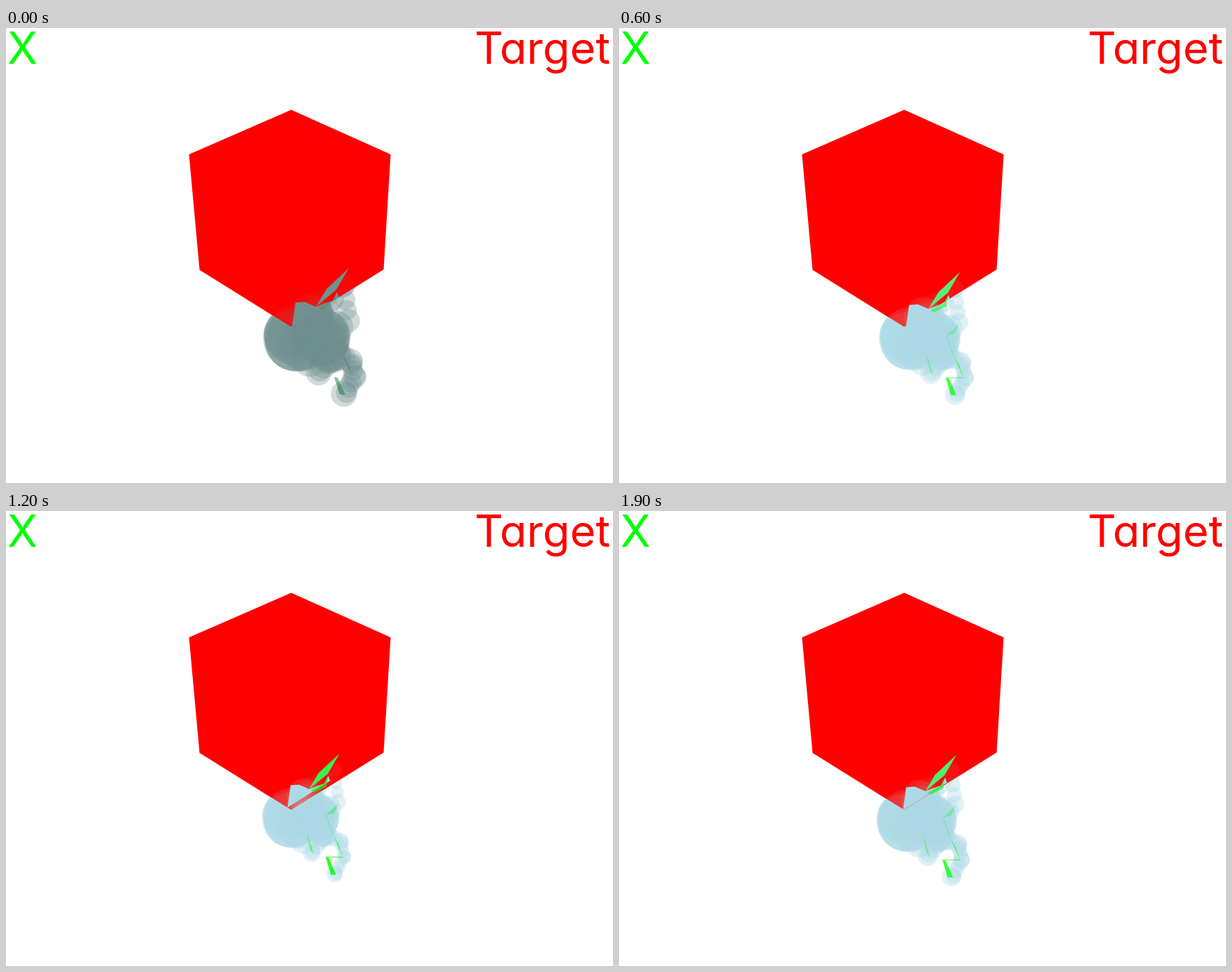
Recreate the animation shown at these times as an HTML page with a canvas. Size 864 by 648 pixels, loop 2000 ms.

```html
<!DOCTYPE html>
<html lang="en">
<head>
<meta charset="utf-8">
<title>Deforming mesh</title>
<style>
  html, body { margin: 0; width: 100%; height: 100%; overflow: hidden; background: #fff; }
  canvas, svg { position: absolute; left: 0; top: 0; width: 864px; height: 648px; }
  text {
    font: 400 63px Inter, sans-serif;
    font-feature-settings: "cv11";
    font-optical-sizing: none;
  }
</style>
</head>
<body>
<canvas id="stage" width="864" height="648"></canvas>
<svg viewBox="0 0 864 648">
  <text x="2" y="51" fill="#0f0">X</text>
  <text x="860" y="51" fill="#f00" text-anchor="end">Target</text>
</svg>
<script>
const ctx = document.getElementById('stage').getContext('2d');
const STEP = 100, FRAMES = 20;

const CUBE = [[406, 116.5], [547.5, 180], [537.5, 344], [406, 426], [275.5, 344.5], [260.5, 180]];

// Resting mesh: silhouette in front of the cube, blade, and bare facets
const SKIN = [[407, 426], [412, 391], [425, 390], [441, 397], [465, 388], [471, 376], [474, 384]];
const BLADE = [[441, 397], [456, 372], [488, 342], [470, 373]];
const STRIP = [[444, 399], [465, 388], [471, 376], [468, 393], [450, 402]];
const SPIKE = [[478, 464], [487, 479], [494, 497]];
const FOOT = [[467, 497], [472, 498], [483, 522], [475, 522]];

// Balls: position, smallest radius, growth with swell
const BALLS = {
  crown: { x: 434, y: 410, core: 20, grow: 15, discs: 8 },
  left:  { x: 414, y: 441, core: 36, grow: 14, discs: 9 },
  right: { x: 449, y: 440, core: 29, grow: 14, discs: 9 },
  belly: { x: 463, y: 464, core: 7, grow: 24, discs: 4 },
  bump:  { x: 445, y: 491, core: 6, grow: 14, discs: 2 },
  side:  { x: 487, y: 417, core: 3, grow: 16, discs: 1 },
  hip:   { x: 491, y: 474, core: 4, grow: 15, discs: 2 },
  knee:  { x: 496, y: 497, core: 2, grow: 17, discs: 2 },
  foot:  { x: 481, y: 521, core: 3, grow: 18, discs: 2 },
  tip:   { x: 480, y: 367, core: 4, grow: 15, discs: 2 }
};
const LINKS = ['left bump', 'right belly', 'belly bump', 'right side', 'belly hip',
  'hip knee', 'knee foot', 'crown tip', 'side tip'].map(s => s.split(' '));

// Breathing of the mesh: frame, swell, drift
const BEATS = [
  { at: 0, swell: .85, dx: 0, dy: 0 },
  { at: 3, swell: 1.05, dx: -1, dy: 0 },
  { at: 8, swell: .42, dx: 1, dy: 2 },
  { at: 12, swell: .48, dx: -8, dy: -4 },
  { at: 14, swell: 1.2, dx: 4, dy: 4 },
  { at: 17, swell: 1.02, dx: 7, dy: -4 },
  { at: 19, swell: .6, dx: -4, dy: 0 }
];

const mix = (a, b, k) => a + (b - a) * k;
const clamp = v => Math.max(0, Math.min(1, v));

function beatAt(frame) {
  const i = BEATS.findLastIndex(b => b.at <= frame);
  const a = BEATS[i], b = BEATS[(i + 1) % BEATS.length];
  const k = (frame - a.at) / ((b.at || FRAMES) - a.at);
  const ease = (1 - Math.cos(Math.PI * k)) / 2;
  return {
    swell: mix(a.swell, b.swell, ease),
    dx: mix(a.dx, b.dx, ease),
    dy: mix(a.dy, b.dy, ease)
  };
}

// Swelling stretches the mesh sideways and upwards
function mover({ swell, dx, dy }) {
  const stretch = .25 * (swell - .85);
  return ([x, y]) => [
    x + dx + (x - 425) * stretch,
    y + dy + Math.min(0, y - 430) * stretch
  ];
}

function seeded(seed) {
  return () => (seed = (seed * 16807) % 2147483647) / 2147483647;
}

function makeDiscs(balls) {
  const rand = seeded(4721);
  const discs = [];
  for (const { x, y, r, discs: count } of Object.values(balls)) {
    discs.push([x, y, r]);
    for (let i = 1; i < count; i++) {
      const size = r * (.7 + .25 * rand());
      const angle = rand() * Math.PI * 2;
      const off = r - size;
      discs.push([x + off * Math.cos(angle), y + off * Math.sin(angle), size]);
    }
  }
  for (const [from, to] of LINKS) {
    const a = balls[from], b = balls[to];
    for (const k of [.3, .6]) {
      discs.push([mix(a.x, b.x, k), mix(a.y, b.y, k), mix(a.r, b.r, k) * .85]);
    }
  }
  return discs;
}

function trace(points) {
  points.forEach(([x, y], i) => i ? ctx.lineTo(x, y) : ctx.moveTo(x, y));
}

function poly(points, fill, alpha = 1) {
  ctx.globalAlpha = alpha;
  ctx.fillStyle = fill;
  ctx.beginPath();
  trace(points);
  ctx.fill();
}

function line(points, color, alpha) {
  ctx.globalAlpha = alpha;
  ctx.strokeStyle = color;
  ctx.lineWidth = 1.6;
  ctx.beginPath();
  trace(points);
  ctx.stroke();
}

function drawDiscs(discs, fill, alpha, rim) {
  ctx.fillStyle = fill;
  ctx.strokeStyle = '#4f686c';
  ctx.lineWidth = 1;
  for (const [x, y, r] of discs) {
    ctx.beginPath();
    ctx.arc(x, y, r, 0, Math.PI * 2);
    ctx.globalAlpha = alpha;
    ctx.fill();
    ctx.globalAlpha = rim;
    ctx.stroke();
  }
}

function clipped(outside, paint) {
  ctx.save();
  ctx.beginPath();
  if (outside) ctx.rect(0, 0, 864, 648);
  trace(CUBE);
  ctx.clip('evenodd');
  paint();
  ctx.restore();
}

function draw(frame) {
  const beat = beatAt(frame);
  const move = mover(beat);
  const place = points => points.map(move);
  const balls = {};
  for (const [name, b] of Object.entries(BALLS)) {
    const [x, y] = move([b.x, b.y]);
    balls[name] = { x, y, r: b.core + b.grow * beat.swell, discs: b.discs };
  }
  const discs = makeDiscs(balls);

  // The opening picture is lit, all others are flat
  const lit = frame === 0;
  const blue = lit ? '#72908f' : '#add8e6';
  const green = lit ? '#14803c' : '#0f0';
  const bare = lit ? 0 : clamp((1.05 - beat.swell) / .6);

  ctx.globalAlpha = 1;
  ctx.clearRect(0, 0, 864, 648);
  poly(CUBE, '#f00');
  clipped(true, () => drawDiscs(discs, blue, lit ? .32 : .36, lit ? .08 : 0));
  clipped(false, () => {
    drawDiscs(discs, blue, lit ? .02 : .035, 0);
    poly(place(SKIN), blue);
  });

  const spike = place(SPIKE), foot = place(FOOT);
  poly(place(BLADE), blue);
  poly(place(BLADE), green, bare * .7);
  poly(place(STRIP), green, mix(.15, .7, bare));
  poly(spike, green, mix(.5, .85, bare));
  poly(foot, green, mix(.5, .85, bare));

  // Fibres show where the balls are thin
  const { bump, side } = balls;
  poly([[bump.x - 7, bump.y - 29], [bump.x + 3, bump.y + 1], [bump.x - 2, bump.y - 4]], green, bare * .5);
  poly([[side.x, side.y + 2], [side.x - 18, side.y + 19], [side.x - 6, side.y + 16]], green, bare * .4);
  line([[side.x - 18, side.y + 19], spike[0]], green, bare * .3);
  line([spike[2], foot[0]], green, bare * .6);
}

let shown = -1;
function tick() {
  const frame = Math.floor(performance.now() / STEP) % FRAMES;
  if (frame !== shown) draw(shown = frame);
  requestAnimationFrame(tick);
}
tick();
</script>
</body>
</html>
```
